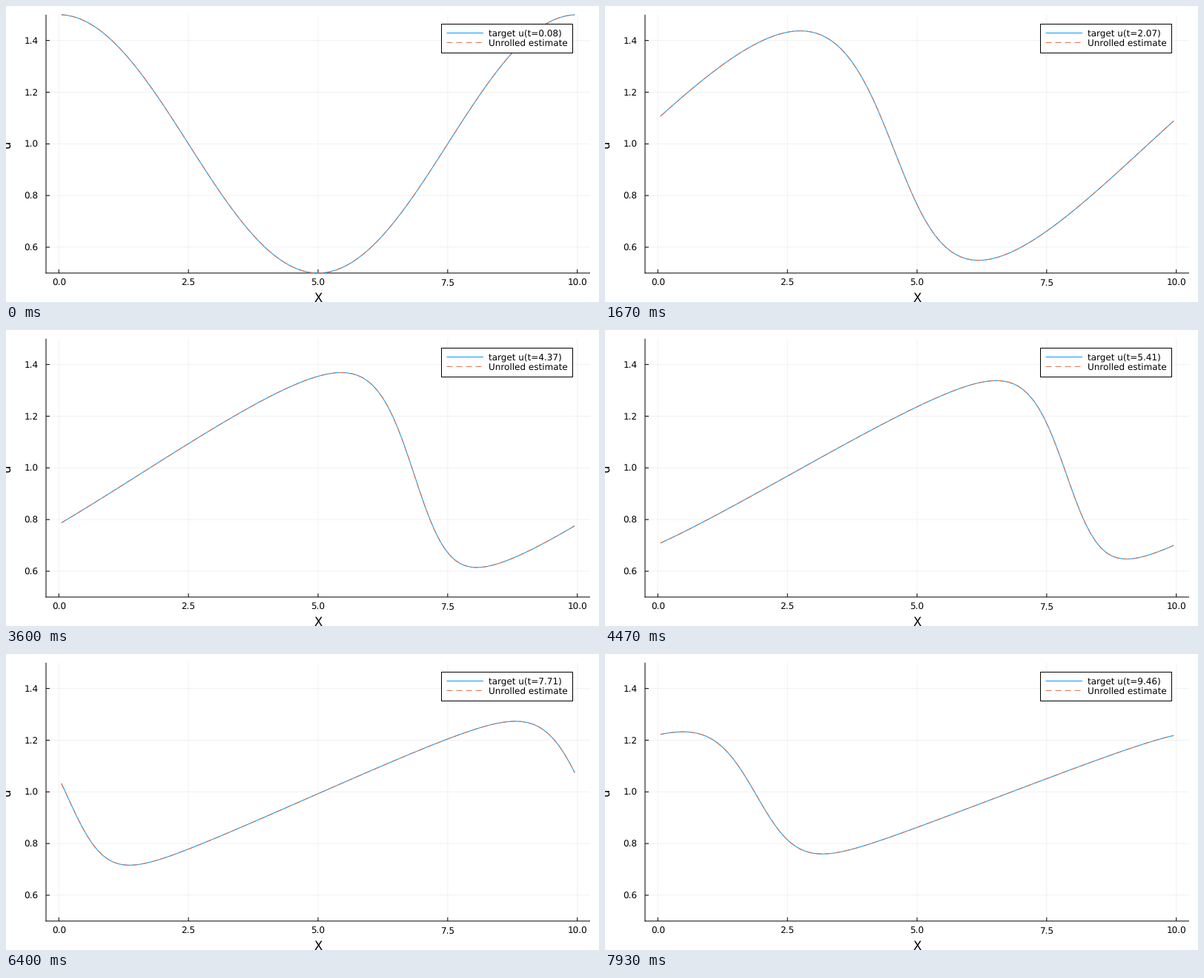
A matplotlib script for the animation above (8000 ms loop, 800 by 400 pixels).

```python
import numpy as np
import matplotlib.pyplot as plt
from matplotlib.animation import FuncAnimation
from matplotlib.patches import Rectangle

W, H, DPI = 800, 400, 100
FRAMES, LOOP = 120, 8000
PX = 72 / DPI
LEFT, RIGHT, TOP, BOTTOM = 54, 788, 11.7, 360.9
BLUE, ORANGE = "#009AFA", "#E26F46"

# Viscous Burgers equation on a periodic grid of cell centres
LENGTH, CELLS, NU = 10.0, 100, 0.1
DX = LENGTH / CELLS
STEP, SUBSTEPS = 0.0795, 5
x = (np.arange(CELLS) + 0.5) * DX

plt.rcParams["font.family"] = "DejaVu Sans"
plt.rcParams["text.hinting"] = "none"


def rate(u):
    before, after = np.roll(u, 1), np.roll(u, -1)
    advection = (u**2 - before**2) / (2 * DX)
    diffusion = NU * (after - 2 * u + before) / DX**2
    return diffusion - advection


def advance(u, dt):
    a = rate(u)
    b = rate(u + dt / 2 * a)
    c = rate(u + dt / 2 * b)
    d = rate(u + dt * c)
    return u + dt / 6 * (a + 2 * b + 2 * c + d)


def solve():
    u = 1 + 0.5 * np.cos(2 * np.pi * x / LENGTH)
    states = [u]
    for _ in range(FRAMES - 1):
        for _ in range(SUBSTEPS):
            u = advance(u, STEP / SUBSTEPS)
        states.append(u)
    return states


# Data range is padded by 3 % on both sides horizontally
PAD = 0.03 * (x[-1] - x[0])
X_MIN, X_MAX = x[0] - PAD, x[-1] + PAD


def to_px(v):
    return LEFT + (v - X_MIN) / (X_MAX - X_MIN) * (RIGHT - LEFT)


def to_py(v):
    return BOTTOM - (v - 0.5) * (BOTTOM - TOP)


fig = plt.figure(figsize=(W / DPI, H / DPI), dpi=DPI, facecolor="white")
ax = fig.add_axes([0, 0, 1, 1])
ax.set_xlim(0, W)
ax.set_ylim(H, 0)
ax.axis("off")


def line(xs, ys, color="black", z=2, **kw):
    kw.setdefault("solid_capstyle", "butt")
    return ax.plot(xs, ys, color=color, lw=PX, zorder=z, snap=False, **kw)[0]


def text(px, py, s, size=12, ha="left", z=7, **kw):
    return ax.text(px, py, s, fontsize=size * PX, ha=ha, va="baseline",
                   zorder=z, **kw)


for v in (0, 2.5, 5, 7.5, 10):
    p = to_px(v)
    line([p, p], [TOP, BOTTOM], alpha=0.055, z=1)
    line([p, p], [BOTTOM, BOTTOM - 5])
    text(p, 378.3, f"{v:.1f}", ha="center")

for v in (0.6, 0.8, 1.0, 1.2, 1.4):
    p = to_py(v)
    line([LEFT, RIGHT], [p, p], alpha=0.055, z=1)
    line([LEFT, LEFT + 5], [p, p])
    text(43.3, p + 4.5, f"{v:.1f}", ha="right")

line([LEFT, LEFT], [TOP, BOTTOM + 0.5])
line([LEFT - 0.5, RIGHT], [BOTTOM, BOTTOM])
text(421, 400, "X", size=16.5, ha="center")
ax.text(9, 186.3, "u", fontsize=16.5 * PX, rotation=90, ha="right",
        va="center", rotation_mode="default")

DASH = dict(linestyle=(0, (8, 5)), dash_capstyle="butt")
target = line(to_px(x), to_py(x * 0 + 1), BLUE, z=3)
estimate = line(to_px(x), to_py(x * 0 + 1), ORANGE, z=4, **DASH)
plot_area = Rectangle((LEFT, TOP - 0.5), RIGHT - LEFT, BOTTOM - TOP + 1,
                      transform=ax.transData)
for curve in (target, estimate):
    curve.set_clip_path(plot_area)

ax.add_patch(Rectangle((586.5, 23.5), 177, 39, facecolor="white",
                       edgecolor="black", lw=PX, zorder=5))
line([594.5, 644], [36.5, 36.5], BLUE, z=6)
line([594.5, 644], [49.4, 49.4], ORANGE, z=6, **DASH)
label = text(650.6, 40.9, "")
text(650.6, 53.9, "Unrolled estimate")

states = solve()


def draw(i):
    ys = to_py(states[i])
    target.set_ydata(ys)
    estimate.set_ydata(ys)
    label.set_text(f"target u(t={round(STEP * (i + 1), 2)})")
    return target, estimate, label


anim = FuncAnimation(fig, draw, frames=FRAMES, interval=LOOP / FRAMES,
                     init_func=lambda: draw(0), repeat=True, repeat_delay=0)
plt.show()
```
